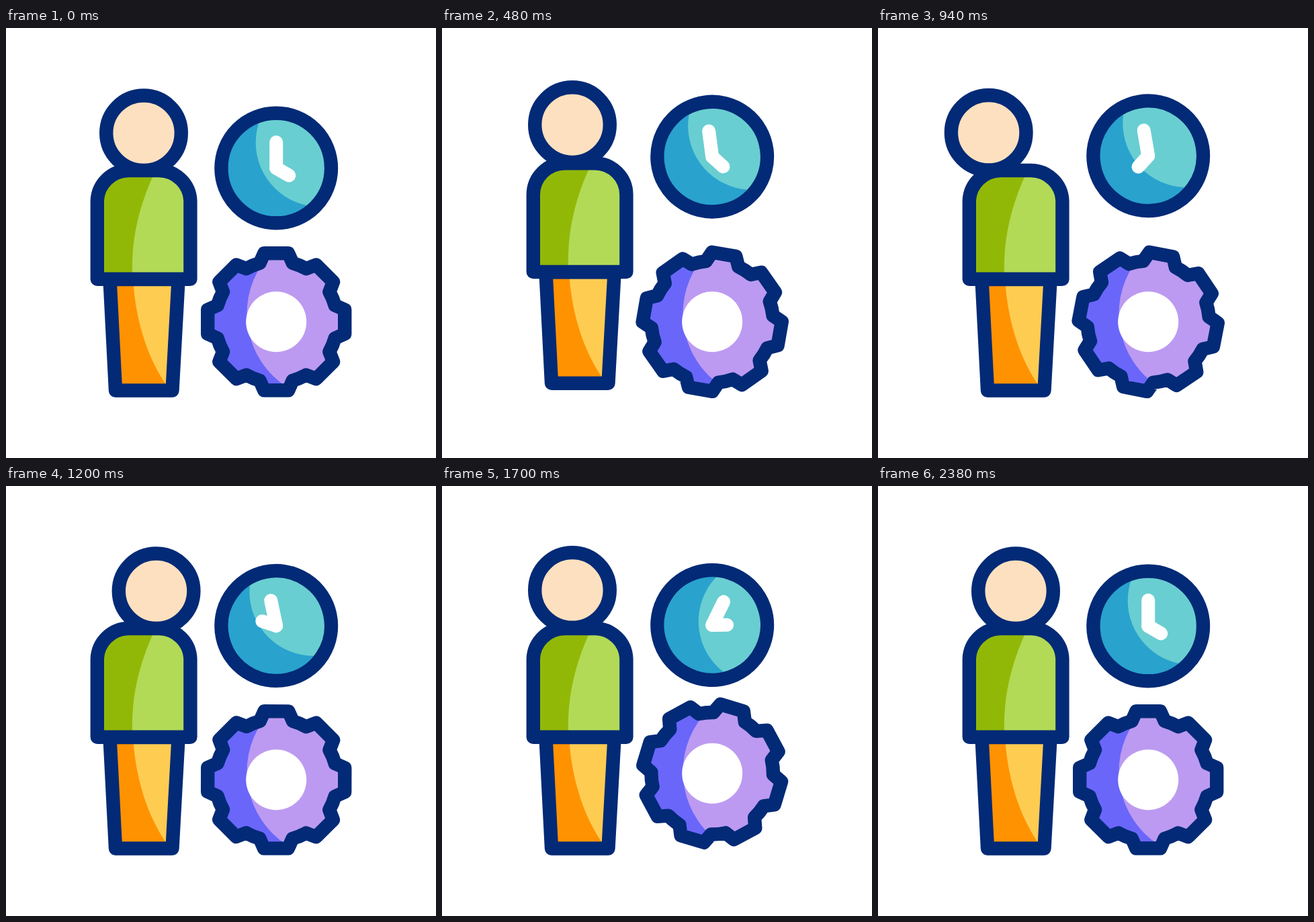
An HTML page for the animation above (2.4 s loop, 640 px wide and 640 px high).

```html
<!DOCTYPE html>
<html lang="en">
<head>
<meta charset="utf-8">
<title>Person, clock and gear</title>
<style>
html, body { margin: 0; width: 100%; height: 100%; overflow: hidden; background: #fff; }
svg { display: block; width: 100vw; height: 100vh; }
.line { stroke: #032a76; stroke-width: 20.4; stroke-linejoin: round; }
.hand { fill: none; stroke: #fff; stroke-width: 20; stroke-linecap: round; stroke-linejoin: round; }
.spark { stroke: #ffc84c; stroke-width: 20; stroke-linecap: round; }
</style>
</head>
<body>
<svg viewBox="0 0 640 640">
  <defs>
    <clipPath id="gearClip"><path id="gearMask"/></clipPath>
    <clipPath id="faceClip"><circle r="80"/></clipPath>
    <path id="legs" d="M154.5 374L163 539.5H247.5L256.6 374Z"/>
    <path id="torso" d="M135.8 373.8V259a47 47 0 0 1 47-47H227.4a47 47 0 0 1 47 47V373.8Z"/>
  </defs>

  <g id="person">
    <circle id="head" class="line" cx="205" cy="156.3" r="55.8" fill="#fde0bf"/>
    <use href="#legs" fill="#ff9200"/>
    <path fill="#ffcc52" d="M189 374C193 436 210 490 239 532H247.5L256.6 374Z"/>
    <use href="#legs" class="line" fill="none"/>
    <use href="#torso" fill="#92b807"/>
    <path fill="#b2da56" d="M222 213C200 260 186 310 188 368H270V259a47 47 0 0 0-42-46Z"/>
    <use href="#torso" class="line" fill="none"/>
  </g>

  <g clip-path="url(#gearClip)">
    <rect x="270" y="290" width="270" height="280" fill="#6a66fa"/>
    <circle cx="488.5" cy="425" r="130" fill="#bc9af1"/>
  </g>
  <path id="gear" class="line" fill="none"/>
  <circle id="hole" cx="402.2" r="45" fill="#fff"/>

  <g id="clock">
    <circle r="81.8" fill="#29a2ce"/>
    <circle cx="65" cy="-38" r="95.5" fill="#69ced1" clip-path="url(#faceClip)"/>
    <circle class="line" r="81.8" fill="none"/>
    <path class="hand" d="M0 0V-38.5"/>
    <path id="hour" class="hand" d="M0 0V-22"/>
  </g>

  <g id="sparks">
    <path class="spark" d="M497.3 101L504.7 87"/>
    <path class="spark" d="M523.5 124.8L535 118.3"/>
  </g>
</svg>
<script>
const LOOP = 2400;
const $ = id => document.getElementById(id);
const [person, head, gear, gearMask, hole, clock, hour, sparks] =
  ["person", "head", "gear", "gearMask", "hole", "clock", "hour", "sparks"].map($);

// Progress of t from a to b, held at both ends.
const part = (t, a, b) => Math.min(1, Math.max(0, (t - a) / (b - a)));
const ramp = (t, a, b) => {
  const p = part(t, a, b);
  return p * p * (3 - 2 * p);
};
// Up and back down once; a higher power softens take-off and landing.
const hop = (t, a, b, power) => Math.max(0, Math.sin(Math.PI * part(t, a, b))) ** power;
// One swing to each side.
const sway = (t, a, b) => Math.sin(2 * Math.PI * part(t, a, b));

const jump = t => -36 * hop(t, 220, 540, 2);
const headX = t => -11 * (ramp(t, 220, 460) - ramp(t, 1960, 2380)) - 34 * sway(t, 680, 1460);
const clockY = t => -27 * hop(t, 220, 1220, 1.5) - 3 * sway(t, 1220, 2380);
const clockTurn = t => -7.5 * ramp(t, 220, 360) - 4.5 * ramp(t, 680, 1200)
  + 38 * ramp(t, 1200, 1700) - 26 * ramp(t, 1700, 2160);
const gearY = t => -14 * hop(t, 1500, 2340, 1);
const gearTurn = t => 167 * ramp(t, 220, 2180) + 13 * part(t, 220, 2180);
const sparkFade = t => ramp(t, 1840, 1950) * (1 - ramp(t, 2000, 2380));

function gearPath() {
  const corners = [[-24.5, -87.4], [-18, -102], [18, -102], [24.5, -87.4]];
  let d = "";
  for (let k = 0; k < 8; k++) {
    const c = Math.cos(k * Math.PI / 4), s = Math.sin(k * Math.PI / 4);
    corners.forEach(([x, y], i) => {
      const cmd = i ? "L" : k ? "A90.8 90.8 0 0 1 " : "M";
      d += cmd + (x * c - y * s).toFixed(2) + " " + (x * s + y * c).toFixed(2);
    });
  }
  return d + "A90.8 90.8 0 0 1 -24.5 -87.4Z";
}

const place = (el, x, y, turn = 0) =>
  el.setAttribute("transform", `translate(${x} ${y}) rotate(${turn})`);

function draw(t) {
  place(person, 0, jump(t));
  const x = headX(t);
  // The head rides over a shallow arc on its left side only.
  place(head, x, x < 0 ? x * (x + 44) / 260 : 0);

  const turn = gearTurn(t);
  const gy = 437.3 + gearY(t);
  place(gear, 402.2, gy, turn);
  place(gearMask, 402.2, gy, turn);
  hole.setAttribute("cy", gy);

  place(clock, 402.2, 208.5 + clockY(t), clockTurn(t));
  hour.setAttribute("transform", `rotate(${120 + 2 * turn})`);

  const far = (t - 2080) * 0.07;
  place(sparks.children[0], far * 0.47, far * -0.88);
  place(sparks.children[1], far * 0.87, far * -0.49);
  sparks.setAttribute("opacity", sparkFade(t));
}

gear.setAttribute("d", gearPath());
gearMask.setAttribute("d", gearPath());

const start = performance.now();
function tick() {
  draw((performance.now() - start) % LOOP);
  requestAnimationFrame(tick);
}
draw(0);
requestAnimationFrame(tick);
</script>
</body>
</html>
```
